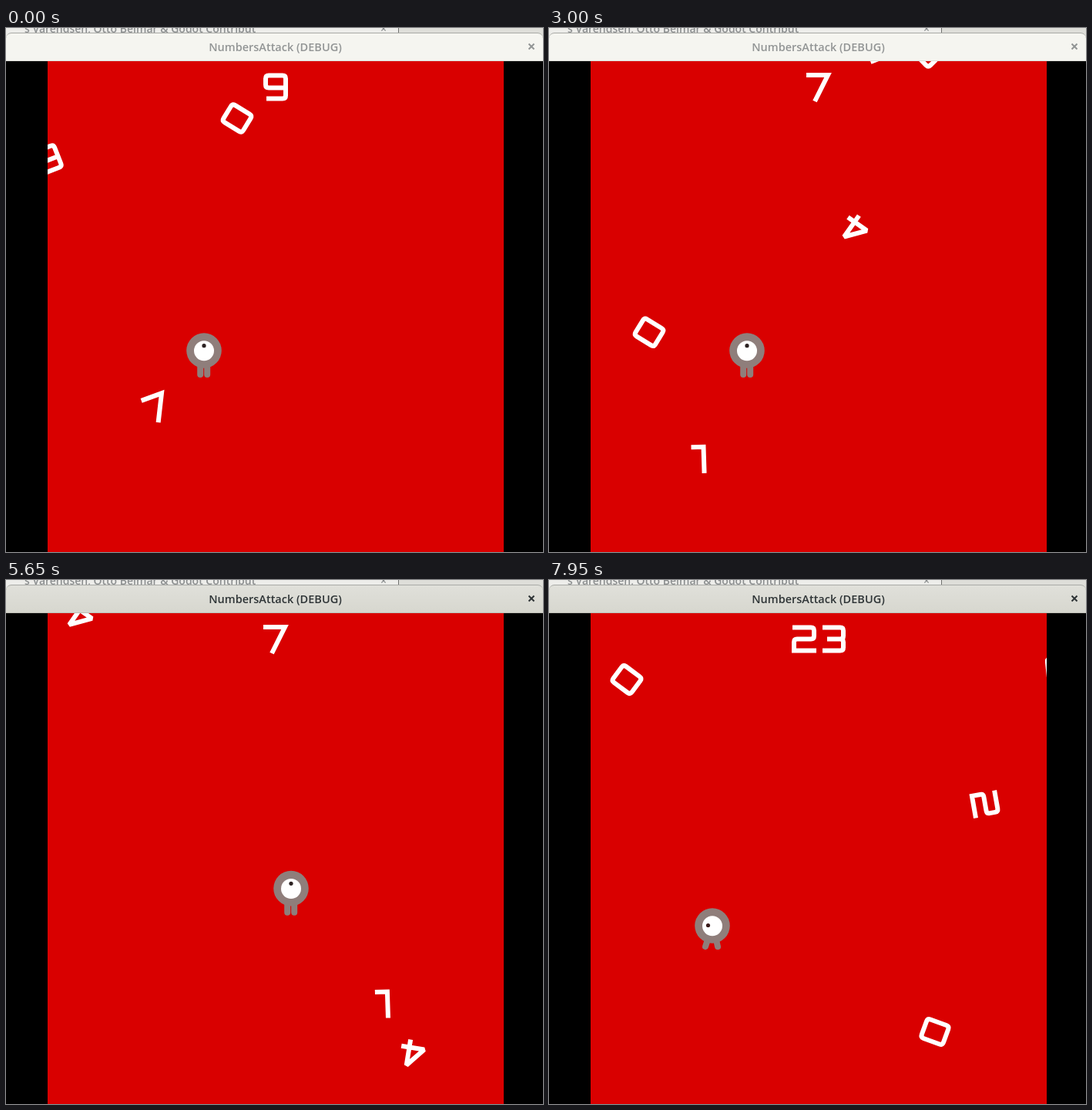
An HTML page with a canvas that plays this animation: 697 px wide and 679 px high, repeating every 8000 ms.

```html
<!DOCTYPE html>
<html lang="en">
<head>
<meta charset="utf-8">
<title>NumbersAttack</title>
<style>
  html, body { margin: 0; width: 697px; height: 679px; overflow: hidden; background: #000; }
  body { position: relative; font-family: "Open Sans", "Noto Sans", sans-serif; }
  canvas { position: absolute; left: 0; top: 0; }
  .behind { position: absolute; left: 0; top: 0; width: 697px; height: 12px; overflow: hidden; background: #deded9; }
  .tab { position: absolute; left: 0; top: 0; width: 509px; height: 12px; background: #ededea; border-right: 1px solid #6f716e; }
  .behind span { position: absolute; top: -9px; font: 600 14px/20px "Open Sans", "Noto Sans", sans-serif; color: #8b8e8f; white-space: nowrap; }
  .bar { position: absolute; left: 0; top: 6px; width: 697px; height: 37px; box-sizing: border-box;
    border-top: 1px solid #a9aaa6; border-bottom: 1px solid #dcdcd7; border-radius: 7px 7px 0 0;
    background: #f5f5f0; color: #929595; text-align: center; font-size: 14.5px; font-weight: 600; line-height: 35px; }
  .bar.focused { background: linear-gradient(#e0e0da, #d7d7cf); border-bottom-color: #bdbdb5; color: #2e3436; }
  .bar b { position: relative; left: 1px; font-weight: 600; }
  .bar svg { position: absolute; left: 677px; top: 12px; }
</style>
</head>
<body>
<canvas width="697" height="679"></canvas>
<div class="behind">
  <div class="tab"></div>
  <span style="left:24px">s Varendsen, Otto Belmar &amp; Godot Contribut</span>
  <span style="left:486px">×</span>
</div>
<div class="bar"><b>NumbersAttack (DEBUG)</b>
  <svg width="10" height="10"><path d="M1.5 1.5l7 7m0-7l-7 7" stroke="currentColor" stroke-width="2"/></svg>
</div>
<script>
const LOOP = 8000, STEP = 50, FOCUS_AT = 3700;
const ctx = document.querySelector('canvas').getContext('2d');
const bar = document.querySelector('.bar');

// Digit centrelines around their middle
const NINE = 'M13 1H-9q-4 0-4-4v-8q0-4 4-4H9q4 0 4 4V11q0 4-4 4H-12';
const RING = 'M-9-15H9q4 0 4 4V11q0 4-4 4H-9q-4 0-4-4V-11q0-4 4-4z';
const GLYPHS = [
  RING,
  'M-10-15.5H6V18.5',
  'M-15-15H9q4 0 4 4v7q0 4-4 4H-9q-4 0-4 4V15H16',
  'M-14-15H9q4 0 4 4v7q0 4-4 4H-8M9 0q4 0 4 4v7q0 4-4 4H-14',
  'M17 8.5H-13L6.5-15V18.5',
  'M14-15H-13V-1H9q4 0 4 4v8q0 4-4 4H-15',
  'M-13-1H9q4 0 4 4v8q0 4-4 4H-9q-4 0-4-4V-11q0-4 4-4H12',
  'M-16-15.5H12L-5 18.5',
  RING + 'M-13 0H13',
  NINE
].map(d => new Path2D(d));

// Flying digits: [digit, time, x, y at that time, vx, vy, vanish time].
// Speed is damped, so places are linear in 1 - e^(-t/10s).
const MOBS = [
  [0, 0, 300, 117, -656, 1070],
  [9, 1100, 203, 112, 1420, -557],
  [7, 0, 196, 492, 1410, -513, 300],
  [4, 3000, 397, 262, -1745, -1233],
  [1, 3000, 195, 558.5, 1707, -54],
  [6, 4050, 588, 128, 1275, 1310],
  [4, 4950, 634, 632, -2558, -416, 6700],
  [3, 4950, 633, 698, 900, -1500],
  [2, 6300, 530, 88, 444, 2494],
  [4, 6300, 635, 127, -3236, -1578],
  [7, 6300, 265, 655, -560, -1820, 7050],
  [5, 6300, 45, 400, 2807, 750, 7350],
  [0, 7950, 501, 585.5, 664, -1825],
  [0, 7950, 101, 129, -1980, 2640],
  [8, 7950, 661, 116, -2900, 300]
];
const SCORES = [[0, '9'], [300, '7'], [6700, '11'], [7050, '18'], [7350, '23']];

// Walks: [start, end, to x, to y, facing]
const WALKS = [
  [0, 1, 257, 418, 'up'],
  [4300, 4620, 370, 418, 'right'],
  [5600, 5660, 370, 396, 'up'],
  [6350, 6750, 370, 540, 'down'],
  [6750, 7080, 250, 540, 'left'],
  [7080, 7340, 250, 446, 'up'],
  [7340, 7450, 212, 446, 'left']
];

const damped = t => 1 - Math.exp(-t / 10000);

function digit(n, x, y, angle = 0) {
  ctx.save();
  ctx.translate(x, y);
  ctx.rotate(angle);
  ctx.lineWidth = 6;
  ctx.miterLimit = 2.2;
  ctx.strokeStyle = '#fff';
  ctx.stroke(GLYPHS[n]);
  ctx.restore();
}

function dot(x, y, r, color) {
  ctx.fillStyle = color;
  ctx.beginPath();
  ctx.arc(x, y, r, 0, 2 * Math.PI);
  ctx.fill();
}

function leg(x1, y1, x2, y2) {
  ctx.beginPath();
  ctx.moveTo(x1, y1);
  ctx.lineTo(x2, y2);
  ctx.stroke();
}

function player(t) {
  let x = 257, y = 418, facing = 'up';
  for (const [start, end, toX, toY, face] of WALKS) {
    if (t < start) break;
    const k = Math.min(1, (t - start) / (end - start));
    x += (toX - x) * k;
    y += (toY - y) * k;
    facing = face;
  }
  const skin = '#8f7e7b', side = facing === 'left' || facing === 'right';
  ctx.save();
  ctx.translate(x, y + (side ? 2 : 0));
  ctx.scale(facing === 'left' ? -1 : 1, facing === 'down' ? -1 : 1);
  ctx.strokeStyle = skin;
  ctx.lineWidth = 8;
  ctx.lineCap = 'round';
  if (side) {
    leg(-5, 18, -7, 27);
    leg(6, 18, 9, 27);
  } else {
    leg(-4.8, 18, -4.8, 31);
    leg(4.2, 18, 4.2, 31);
  }
  dot(0, 0, 22.8, skin);
  dot(0, 0.3, 13, '#fff');
  if (side) dot(5.5, -0.5, 2.6, '#3a1a1a');
  else dot(0, -6.3, 2.6, '#2c2222');
  ctx.restore();
}

function draw(t) {
  bar.classList.toggle('focused', t >= FOCUS_AT);
  ctx.fillStyle = '#000';
  ctx.fillRect(0, 0, 697, 679);
  ctx.save();
  ctx.beginPath();
  ctx.rect(54, 43, 592, 636);
  ctx.clip();
  ctx.fillStyle = '#d90000';
  ctx.fillRect(54, 43, 592, 636);
  player(t);
  for (const [n, at, x, y, vx, vy, end = LOOP] of MOBS) {
    if (t >= end) continue;
    const p = damped(t) - damped(at);
    digit(n, x + vx * p, y + vy * p, Math.atan2(vy, vx));
  }
  const score = SCORES.filter(s => s[0] <= t).pop()[1];
  [...score].forEach((c, i) => digit(+c, 350 + (i - (score.length - 1) / 2) * 38, 76.5));
  ctx.restore();
}

const began = performance.now();
function tick() {
  const t = (performance.now() - began) % LOOP;
  draw(Math.floor(t / STEP) * STEP);
  requestAnimationFrame(tick);
}
tick();
</script>
</body>
</html>
```
